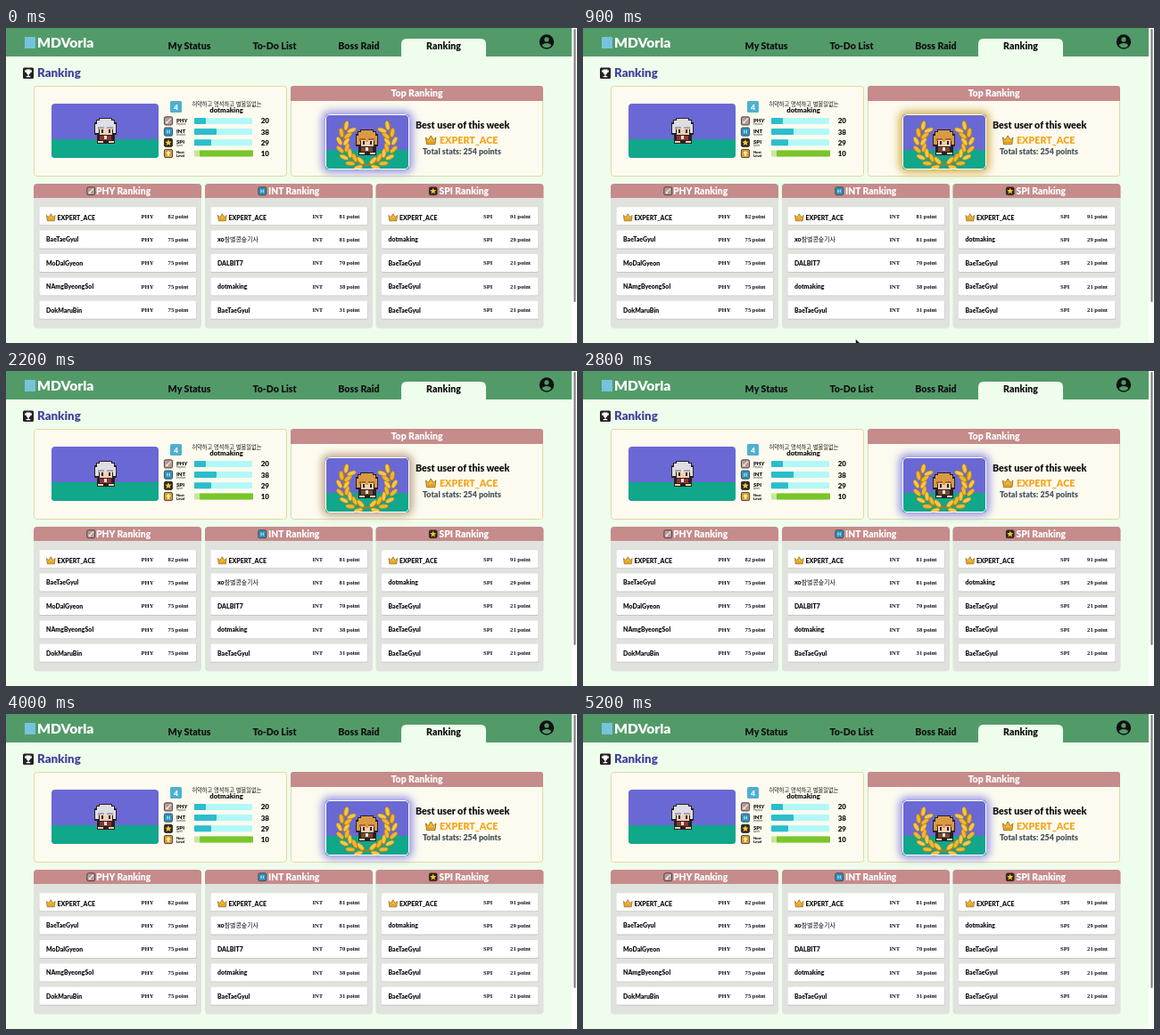
These frames come from a looping animation (640x354 px, 5.3 s). An HTML page:

```html
<!DOCTYPE html>
<html lang="ko">
<head>
<meta charset="utf-8">
<title>Ranking</title>
<style>
  html, body { margin: 0; width: 100%; height: 100%; overflow: hidden; background: #effdec; }
  svg { position: absolute; left: 0; top: 0; display: block; }
  text { font-family: Lato, "Noto Sans CJK KR", "Noto Sans CJK", sans-serif; font-weight: 900; white-space: pre; }
  .serif { font-family: "Liberation Serif", serif; font-weight: 700; }
  .hangul { font-family: "Noto Sans CJK KR", "Noto Sans CJK", sans-serif; font-weight: 400; }
  #glow { position: absolute; left: 358px; top: 97px; width: 94px; height: 62px; box-sizing: border-box;
    border: 1.5px solid #fff; border-radius: 5px; }
</style>
</head>
<body>
<svg id="page" width="640" height="354" viewBox="0 0 640 354"></svg>
<div id="glow"></div>
<script>
const NS = 'http://www.w3.org/2000/svg';
const page = document.getElementById('page');
const glow = document.getElementById('glow');

function add(tag, attrs, body) {
  const el = document.createElementNS(NS, tag);
  for (const key in attrs) el.setAttribute(key, attrs[key]);
  if (body !== undefined) el.textContent = body;
  page.appendChild(el);
  return el;
}
const box = (x, y, width, height, fill, rx = 0, more = {}) => add('rect', { x, y, width, height, fill, rx, ...more });
const shape = (d, fill, more = {}) => add('path', { d, fill, ...more });
const label = (x, y, size, fill, str, more = {}) => add('text', { x, y, 'font-size': size, fill, ...more }, str);
const middle = { 'text-anchor': 'middle' };
const end = { 'text-anchor': 'end' };
const INK = '#111', PINK = '#c68b8b', GREEN = '#529b69', MINT = '#effdec';
const CHAMP = 'EXPERT_ACE', ME = 'dotmaking';

function crown(x, y, s) {
  const transform = `translate(${x} ${y}) scale(${s})`;
  shape('M0 2L3 5L6 0L9 5L12 2L11 10H1Z', '#f6b82e', { transform, stroke: '#7a5310', 'stroke-width': .8, 'stroke-linejoin': 'round' });
  shape('M1.3 7.6H10.7', 'none', { transform, stroke: '#c98317', 'stroke-width': 1 });
}

function icon(kind, x, y, s = 10) {
  const fill = { PHY: '#b89a98', INT: '#35a5d4', SPI: '#2b2722', NEXT: '#d99a35' }[kind];
  const transform = `translate(${x} ${y}) scale(${s / 10})`;
  box(.4, .4, 9.2, 9.2, fill, 1.6, { transform, stroke: '#252525', 'stroke-width': .8 });
  if (kind === 'PHY') shape('M2.5 7.8L7.8 2.3M2.4 5.6L4.5 7.6', 'none', { transform, stroke: '#f7eeee', 'stroke-width': 1.1 });
  if (kind === 'INT') shape('M2.4 2.5H7.6V7.5H2.4ZM5 2.5V7.5', '#8fe0f5', { transform, stroke: '#125f91', 'stroke-width': .7 });
  if (kind === 'SPI') shape('M5 1.4L6.1 3.8L8.7 4L6.7 5.7L7.4 8.3L5 6.9L2.6 8.3L3.3 5.7L1.3 4L3.9 3.8Z', '#f7c52d', { transform });
  if (kind === 'NEXT') shape('M5 2L8 5H6.2V8H3.8V5H2Z', '#fff0a8', { transform });
}

// Small sitting sprite built from blocks
function hero(x, y, hair, shade, coat) {
  const b = (dx, dy, w, h, c) => box(x + dx, y + dy, w, h, c, 0, { 'shape-rendering': 'crispEdges' });
  const dark = '#29211f', skin = '#f5cdb2';
  b(7, 0, 15, 3, dark);
  b(4, 2, 21, 4, dark);
  b(2, 5, 25, 14, dark);
  b(5, 18, 20, 11, dark);
  b(8, 1, 13, 5, hair);
  b(5, 3, 19, 8, hair);
  b(3, 7, 4, 10, hair);
  b(23, 7, 3, 10, hair);
  b(6, 10, 17, 3, shade);
  b(8, 12, 14, 7, skin);
  for (const dx of [10, 18]) b(dx, 13, 2, 4, dark);
  b(13, 10, 3, 4, hair);
  b(8, 20, 13, 5, coat);
  b(13, 20, 3, 4, '#eee2d2');
  b(6, 26, 6, 2, skin);
  b(18, 26, 6, 2, skin);
}

function scene(x, y, w, h, horizon) {
  box(x, y, w, h, '#6a68d4', 4);
  shape(`M${x} ${horizon}H${x + w}V${y + h - 4}q0 4 -4 4H${x + 4}q-4 0 -4 -4Z`, '#10a78a');
}

function wreath(cx, cy) {
  for (const side of [-1, 1]) {
    add('path', { d: `M${cx} ${cy + 27}Q${cx + side * 31} ${cy + 22} ${cx + side * 25} ${cy - 21}`, fill: 'none', stroke: '#b87913', 'stroke-width': 1.8 });
    for (let i = 0; i < 7; i++) {
      const a = (18 + i * 19) * Math.PI / 180;
      for (const [r, turn] of [[31, 32], [23, -28]]) {
        const x = cx + side * r * Math.sin(a), y = cy + 2 + (r - 2) * Math.cos(a);
        const angle = side * (90 - (18 + i * 19) + turn);
        add('ellipse', { cx: x, cy: y, rx: 2.4, ry: 5.2, fill: i % 2 ? '#efb82d' : '#f5c947', stroke: '#b27a16', 'stroke-width': .6, transform: `rotate(${angle} ${x} ${y})` });
      }
    }
  }
}

function header() {
  box(0, 0, 634, 354, MINT);
  box(0, 0, 634, 32, GREEN);
  box(21, 10, 12, 13, '#75c4dc');
  label(35, 22, 15.6, '#fff', 'MDVorla');
  shape('M443 33V18q0-6 6-6H532q6 0 6 6V33Z', MINT);
  [['My Status', 205.5], ['To-Do List', 301], ['Boss Raid', 395.5], ['Ranking', 490.5]]
    .forEach(([str, x]) => label(x, 24.3, 10.6, INK, str, middle));
  add('circle', { cx: 606, cy: 15.5, r: 8.2, fill: INK });
  add('circle', { cx: 606, cy: 12.9, r: 2.6, fill: GREEN });
  shape('M600.8 19.7q1-2.6 5.2-2.6t5.2 2.6q-2 2.5-5.2 2.5t-5.2-2.5Z', GREEN);
  box(634, 0, 6, 354, '#fcfcfc');
  box(636.5, 1, 2, 307, '#777', 1);

  box(19, 44.5, 12, 12.5, '#222', 1.5);
  shape('M22.5 46.5H27.5V49.5Q27 52 25.6 52.3V54H27.3V55.3H22.7V54H24.4V52.3Q23 52 22.5 49.5ZM22.3 47.5H20.8Q21 50.3 23 50.3M27.7 47.5H29.2Q29 50.3 27 50.3', '#fff');
  label(35, 55.3, 13.3, '#43439b', 'Ranking');
}

function profile() {
  box(31.5, 65.5, 283, 101, '#fdfbef', 3, { stroke: '#e6d7a1' });
  scene(51, 85, 120, 61, 125);
  hero(97, 101, '#dedde2', '#a6a5b2', '#8c3438');
  box(184, 82, 13, 13, '#4fb0d0', 1.5);
  label(190.5, 91.5, 8, '#fff', '4', middle);
  label(247.5, 87.6, 6.25, INK, '허약하고 명석하고 별볼일없는', { ...middle, class: 'hangul' });
  label(247, 94.8, 7.8, INK, ME, middle);
  [['PHY', 'Physical', 20, 13], ['INT', 'Intellect', 38, 25], ['SPI', 'Spirit', 29, 19], ['NEXT', '', 10, 66]].forEach(([kind, hint, value, fill], i) => {
    const y = 104.4 + i * 12.2, next = kind === 'NEXT';
    icon(kind, 177, y - 5);
    if (next) {
      label(191, y - .2, 4, INK, 'Next');
      label(191, y + 3.8, 4, INK, 'Level');
    } else {
      label(191, y + 1.2, 6, INK, kind);
      label(191, y + 4.3, 2.8, '#777', hint);
    }
    box(211, y - 3.5, next ? 66 : 65, 7, next ? '#c5e89c' : '#b2f8f8', 1);
    box(next ? 217 : 211, y - 3.5, next ? 60 : fill, 7, next ? '#7ac52b' : '#2bbdcc', 1);
    label(295, y + 3, 8, INK, value, end);
  });
}

function topUser() {
  box(319.5, 65.5, 282, 101, '#fdfbef', 3, { stroke: '#e6d7a1' });
  shape('M319 82V68q0-3 3-3H599q3 0 3 3V82Z', PINK);
  label(460.5, 77.3, 10.5, '#fff', 'Top Ranking', middle);
  scene(358, 97, 94, 62, 137);
  wreath(404.5, 127);
  hero(390, 114, '#d89a45', '#a8662a', '#754a34');
  label(459, 113, 10.7, INK, 'Best user of this week');
  crown(470.5, 121, .95);
  label(486, 130, 10.7, '#f8a51b', CHAMP);
  label(467, 142.2, 8.9, '#46515c', 'Total stats: 254 points');
}

function board(x, kind, rows) {
  box(x, 175, 188, 162.5, '#e0e2de', 4);
  shape(`M${x} 191V179q0-4 4-4H${x + 184}q4 0 4 4V191Z`, PINK);
  icon(kind, x + 59.5, 178.5, 9.5);
  label(x + (kind === 'PHY' ? 70 : 71), 187, 10.3, '#fff', kind + ' Ranking');
  rows.forEach(([name, points], i) => {
    const y = 201.2 + i * 26.4, champ = i === 0;
    box(x + 6.5, y + .9, 176, 20, '#c5c7c3', 1.5);
    box(x + 6.5, y, 175.5, 20, '#fff', 1.5);
    if (champ) crown(x + 14.5, y + 7.6, .8);
    const el = label(x + (champ ? 26.5 : 14), y + (champ ? 14.7 : 12.7), 6.95, INK, name);
    const split = name.search(/[가-힣]/);
    if (split > 0) {
      el.textContent = name.slice(0, split);
      const tail = document.createElementNS(NS, 'tspan');
      tail.setAttribute('class', 'hangul');
      tail.textContent = name.slice(split);
      el.appendChild(tail);
    }
    label(x + 120.5, y + 12.4, 6.6, INK, kind, { class: 'serif' });
    label(x + 173.5, y + 12.4, 6.6, INK, points + ' point', { ...end, class: 'serif' });
  });
}

header();
profile();
topUser();
const REGULAR = 'BaeTaeGyul';
board(31, 'PHY', [[CHAMP, 82], [REGULAR, 75], ['MoDalGyeon', 75], ['NAmgByeongSol', 75], ['DokMaruBin', 75]]);
board(223, 'INT', [[CHAMP, 81], ['xo참별콩숲기사', 81], ['DALBIT7', 70], [ME, 38], [REGULAR, 31]]);
board(414.5, 'SPI', [[CHAMP, 91], [ME, 29], [REGULAR, 21], [REGULAR, 21], [REGULAR, 21]]);
const pointer = shape('M305.5 349.5V358L307.5 356L309 359L310.5 358L309 355.5H312Z', '#111', { stroke: '#fff', 'stroke-width': .5 });

const LOOP = 5300, PULSE = 1200;
const BLUE = [137, 137, 226], GOLD = [207, 169, 62];
const STEPS = [[0, 0], [550, 0], [800, 1], [900, 1], [1150, 0], [PULSE, 0]];

function warmth(t) {
  const i = STEPS.findIndex(([at]) => at > t);
  const [t0, v0] = STEPS[i - 1], [t1, v1] = STEPS[i];
  return v0 + (v1 - v0) * (t - t0) / (t1 - t0);
}

function draw(now) {
  const t = now % LOOP;
  const k = warmth(t % PULSE);
  const rgb = BLUE.map((c, i) => Math.round(c + (GOLD[i] - c) * k));
  glow.style.boxShadow = `0 0 9px 4px rgba(${rgb}, .85)`;
  pointer.style.display = t >= 500 && t < 1200 ? '' : 'none';
}

const start = performance.now();
function tick() {
  draw(performance.now() - start);
  requestAnimationFrame(tick);
}
tick();
</script>
</body>
</html>
```
